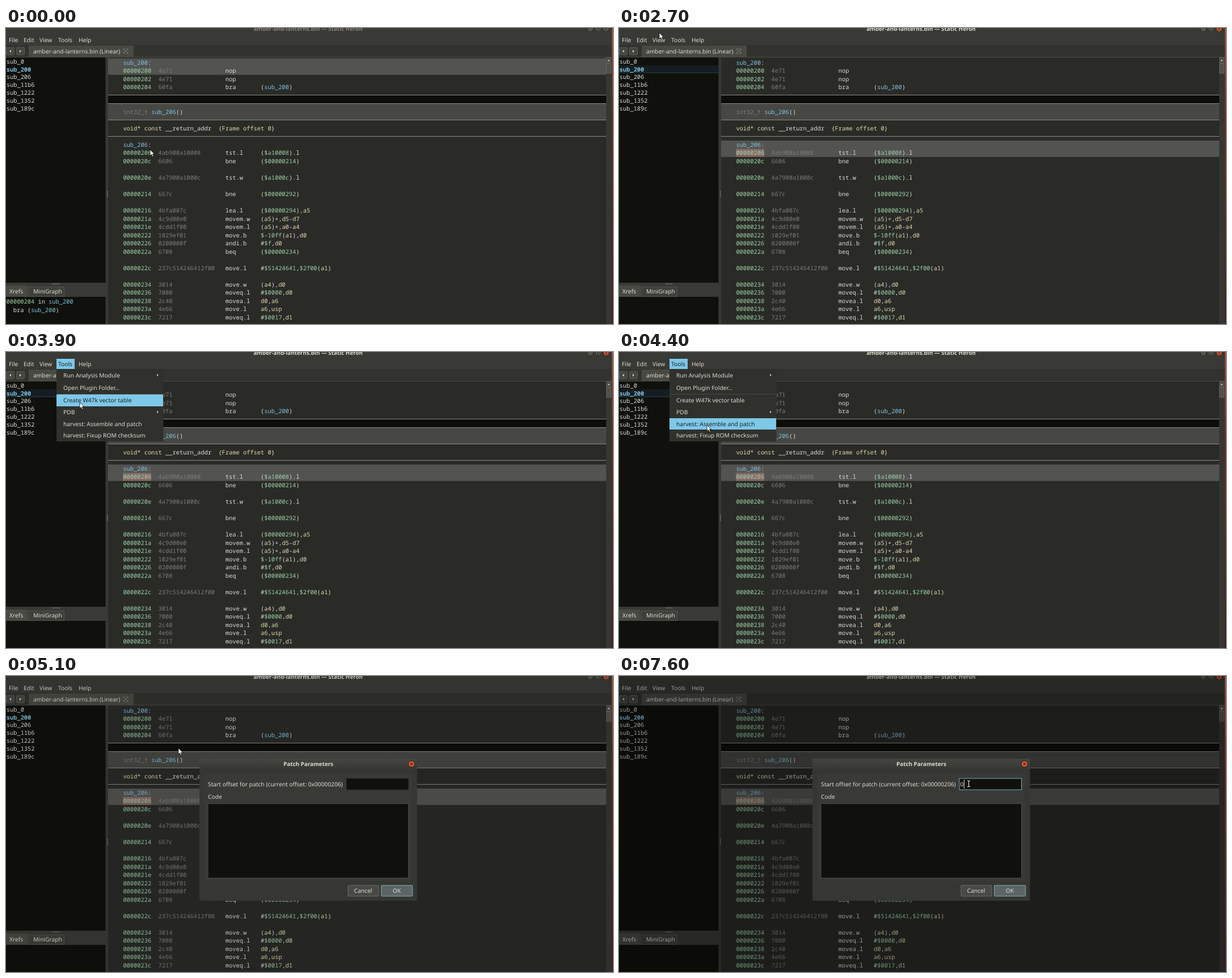
These frames come from a looping animation (1070 px wide and 523 px high, 8 s). An HTML page:

```html
<!DOCTYPE html>
<html lang="en">
<head>
<meta charset="utf-8">
<title>Disassembler patch</title>
<style>
html, body { margin: 0; width: 100%; height: 100%; overflow: hidden; background: #2a2b27; }
svg { display: block; width: 1070px; height: 523px; }
text { white-space: pre; text-rendering: geometricPrecision; }
.ui { font: 10.25px "Noto Sans", "Open Sans", sans-serif; fill: #dcdad2; }
.bold { font: bold 9.85px "Noto Sans", "Open Sans", sans-serif; fill: #dfdbd2; }
.mono { font: 10.37px "Noto Sans Mono", "DejaVu Sans Mono", monospace; fill: #dcdcda; }
.num { fill: #9cd0a8; }
.reg { fill: #e4d8b0; }
.fn { fill: #80c0e0; }
.dim { fill: #7c7d7a; }
.st { display: none; }
.st.on { display: inline; }
.item rect { fill: none; }
.item.on rect { fill: #7ec8e8; }
.item.on text { fill: #1c2226; }
.item path { fill: #b5b3ac; }
</style>
</head>
<body>
<svg id="stage" viewBox="0 0 1070 523" xmlns="http://www.w3.org/2000/svg"></svg>
<script>
const LOOP = 8000, STEP = 100;
const CELL = 6.222, LEFT = 206.4, PITCH = 14.52;
const FILE = 'amber-and-lanterns.bin';

const esc = s => s.replace(/&/g, '&amp;').replace(/</g, '&lt;');
const rect = (x, y, w, h, fill, more = '') =>
  `<rect x="${x}" y="${y}" width="${w}" height="${h}" fill="${fill}" ${more}/>`;
// y is the middle of the capitals
const text = (x, y, s, cls = 'ui', more = '') =>
  `<text x="${x}" y="${y + 3.7}" class="${cls}" ${more}>${esc(s)}</text>`;
const path = (d, more) => `<path d="${d}" ${more}/>`;
const group = (id, body, cls = 'st') => `<g id="${id}" class="${cls}">${body}</g>`;
const middle = 'text-anchor="middle"';

const rowY = row => 61 + row * PITCH;
const code = (row, col, s, cls = '') =>
  text(LEFT + col * CELL, rowY(row), s, 'mono ' + cls);
const band = (row, count, fill) => rect(180, rowY(row) - 7.4, 878, count * PITCH, fill);
const rule = y => rect(180, y, 878, 1, '#8b8c88');

function operands(row, s) {
  const parts = s.matchAll(/(\$-?[0-9a-f]+)|(\b[ad][0-7]\b|usp)|(sub_\w+)|./g);
  let out = '';
  for (const p of parts) {
    const cls = p[1] ? 'num' : p[2] ? 'reg' : p[3] ? 'fn' : '';
    out += code(row, 39 + p.index, p[0], cls);
  }
  return out;
}

const listing = `1 00000200 4e71 nop
2 00000202 4e71 nop
3 00000204 60fa bra (sub_200)
11 00000206 4ab900a10008 tst.l ($a10008).l
12 0000020c 6606 bne ($00000214)
14 0000020e 4a7900a1000c tst.w ($a1000c).l
16 00000214 667c bne ($00000292)
18 00000216 4bfa007c lea.l ($00000294),a5
19 0000021a 4c9d00e0 movem.w (a5)+,d5-d7
20 0000021e 4cdd1f00 movem.l (a5)+,a0-a4
21 00000222 1029ef01 move.b $-10ff(a1),d0
22 00000226 0200000f andi.b #$f,d0
23 0000022a 6708 beq ($00000234)
25 0000022c 237c514246412f00 move.l #$51424641,$2f00(a1)
27 00000234 3014 move.w (a4),d0
28 00000236 7000 moveq.l #$0000,d0
29 00000238 2c40 movea.l d0,a6
30 0000023a 4e66 move.l a6,usp
31 0000023c 7217 moveq.l #$0017,d1`;

function codeView() {
  let out = rect(180, 52, 878, 471, '#2a2b27')
    + group('selFirst', band(0, 2, '#535451'))
    + group('selSecond', band(10, 2, '#535451'))
    + rect(180, 119, 878, 14, '#0d0e0a') + rect(180, 133, 878, 29, '#474844')
    + [118, 133, 162, 191].map(rule).join('')
    + group('mark', rect(206, 213.5, 50, 14, '#876866'))
    + code(0, 0, 'sub_200', 'fn') + code(0, 7, ':')
    + code(6, 0, 'int32_t', 'dim') + code(6, 8, 'sub_206', 'fn') + code(6, 15, '()')
    + code(8, 0, 'void* const', 'reg') + code(8, 12, '__return_addr')
    + code(8, 27, '{Frame offset 0}', 'reg')
    + code(10, 0, 'sub_206', 'fn') + code(10, 7, ':');
  for (const line of listing.split('\n')) {
    const [row, addr, bytes, op, args = ''] = line.split(' ');
    out += code(+row, 0, addr, 'num') + code(+row, 10, bytes, 'dim')
      + code(+row, 29, op) + operands(+row, args);
  }
  return out;
}

function windowButtons(closeFill) {
  return [1030, 1044, 1058].map((x, i) =>
    `<circle cx="${x}" cy="1.5" r="5" fill="${i == 2 ? closeFill : '#5c5b55'}" stroke="#272723"/>`).join('')
    + path('M1028 2h4M1042.500 0h3.500v4h-3.500zM1056 0l4 4m0-4l-4 4', 'stroke="#30302c" fill="none"');
}

function chrome() {
  const title = `${FILE} — Static Heron`;
  const caption = fill => text(532.5, 1.6, title, 'bold', `${middle} style="fill:${fill}"`);
  const arrow = (x, d) => rect(x, 34.5, 14, 13, '#454640', 'stroke="#5b5b55" rx="1"')
    + path(d, 'fill="#d0cec6"');
  const names = [[5, 'File'], [31, 'Edit'], [59, 'View'], [128, 'Help']];
  return rect(0, 0, 1068, 523, '#393935') + rect(0, 30, 1068, 22, '#32332e')
    + group('idle', caption('#85837b') + windowButtons('#5c5b55'))
    + group('active', caption('#dfdbd2') + windowButtons('#d2552e'))
    + names.map(([x, s]) => text(x, 21, s)).join('')
    + group('tools', rect(89, 12, 32, 18, 'none') + text(92, 21, 'Tools'), 'item')
    + arrow(0.5, 'M9 38.500v5l-3-2.500z') + arrow(18.500, 'M24 38.500v5l3-2.500z')
    + rect(40, 31, 185, 21, '#484943')
    + text(48, 41.5, `${FILE} (Linear)`)
    + path('M207 37l8 8m0-8l-8 8M207 40v-3h3m2 0h3v3m0 2v3h-3m-2 0h-3v-3', 'stroke="#77776f" fill="none"')
    + rect(0, 51, 1068, 1, '#4b4c46');
}

function sidebar() {
  const names = ['sub_0', 'sub_200', 'sub_206', 'sub_11b6', 'sub_1222', 'sub_1352', 'sub_189c'];
  let out = rect(0, 52, 175.5, 398, '#10110c')
    + group('listFocus', rect(0, 66, 175.5, 13.500, '#151d22') + rect(0, 78.5, 175.5, 1, '#2c4451'));
  names.forEach((s, i) => {
    out += text(0.8, 59 + i * 13.85, s, 'mono' + (i == 1 ? ' fn' : ''),
      i == 1 ? 'font-weight="bold" style="font-weight:bold"' : '');
  });
  for (let i = 0; i < 6; i++) out += rect(82 + i * 2.2, 451.5, 1.2, 1.5, '#8a8a83');
  for (let i = 0; i < 5; i++) out += rect(178, 288 + i * 2.2, 1.5, 1.2, '#8a8a83');
  return out
    + rect(0, 455, 37, 20, '#494a44') + rect(38.5, 457.5, 64, 17, '#3f403b', 'stroke="#53544e"')
    + text(6, 465, 'Xrefs') + text(48, 465.5, 'MiniGraph')
    + rect(0, 475, 175.5, 48, '#10110c')
    + group('xrefs', text(0.5, 483.5, '00000204', 'mono num') + text(56.5, 483.5, 'in', 'mono')
      + text(75, 483.5, 'sub_200', 'mono fn') + text(12.8, 498, 'bra (', 'mono')
      + text(12.8 + 5 * CELL, 498, 'sub_200', 'mono fn') + text(12.8 + 12 * CELL, 498, ')', 'mono'));
}

const scrollbar = () => rect(1058, 52, 9.500, 471, '#363732')
  + rect(1058.5, 52.5, 8, 9, '#484943', 'stroke="#5b5c56"')
  + path('M1060 58.500h5l-2.500-3z', 'fill="#c0beb6"')
  + rect(1058.5, 62.5, 8, 17.500, '#50514b', 'stroke="#63645e"');

function menu() {
  const items = [
    [31, 21, 'Run Analysis Module', 1], [53, 21, 'Open Plugin Folder...'],
    [75, 21, 'Create W47k vector table'], [96, 21, 'PDB', 1],
    [117, 20, 'harvest: Assemble and patch'], [137, 20.5, 'harvest: Fixup ROM checksum']];
  return group('menu', rect(89, 30, 188.5, 128, '#30312d')
    + rect(90, 74, 186, 1, '#484943')
    + items.map(([y, h, s, sub], i) => group('item' + i,
      rect(89, y, 188, h, 'none') + text(101, y + h / 2, s)
      + (sub ? path(`M266 ${y + 7.5}v5l3-2.500z`, '') : ''), 'item')).join(''));
}

function dialog() {
  return group('dialog', rect(341, 146, 383.5, 251, '#363733', 'rx="2"')
    + rect(341, 146, 383.5, 20, 'url(#bar)', 'rx="2"')
    + text(533, 155.5, 'Patch Parameters', 'bold', middle)
    + '<circle cx="714.800" cy="155.500" r="5.500" fill="#dc5a32" stroke="#23231f"/>'
    + path('M712.800 153.500l4 4m0-4l-4 4', 'stroke="#4a2115" stroke-width="1.200"')
    + rect(349.5, 172.5, 366, 190, '#393a36', 'rx="2"')
    + text(356, 191.5, 'Start offset for patch (current offset: 0x00000206)')
    + rect(600, 181, 109.5, 20, '#10110c', 'stroke="#272823"')
    + group('field', rect(600, 181, 109.5, 20, '#10110c', 'stroke="#7fb2cc"'))
    + group('caret', rect(601, 183, 1, 16, '#e8e8e6'))
    + group('typed', text(601.5, 191.5, '0') + rect(607.8, 183, 1, 16, '#e8e8e6'))
    + text(356, 213.5, 'Code')
    + rect(356, 225.5, 353.5, 131.5, '#10110c', 'stroke="#4a4b46"')
    + rect(603, 370, 54, 19, '#494a46', 'stroke="#6c6d68" rx="1"')
    + rect(661.5, 370, 55, 19, '#5c6564', 'stroke="#86a9bb" rx="1"')
    + text(629.5, 379.5, 'Cancel', 'ui', middle) + text(689, 379.5, 'OK', 'ui', middle));
}

const pointer = () => `<g id="pointer">`
  + group('arrow', path('M0 0V10.500L2.400 8.400L4.200 12.300L6 11.500L4.300 7.700H7.600Z',
    'fill="#fff" stroke="#111" stroke-width=".8"'))
  + group('beam', path('M-2.500-5Q0-5 0-4Q0-5 2.500-5M0-4V5M-2.500 5.500Q0 5.500 0 4.500Q0 5.500 2.500 5.500',
    'fill="none" stroke="#eee" stroke-width="1.100"')) + '</g>';

document.getElementById('stage').innerHTML = `<defs>
  <linearGradient id="bar" x2="0" y2="1"><stop stop-color="#454540"/><stop offset="1" stop-color="#363733"/></linearGradient>
  <linearGradient id="desk" x2="0" y2="1"><stop stop-color="#a8502f"/><stop offset=".3" stop-color="#742d22"/><stop offset="1" stop-color="#4a191b"/></linearGradient>
  </defs>` + chrome() + sidebar() + codeView() + scrollbar()
  + rect(0, 0, 1068, 523, '#000', 'id="shade" opacity="0"')
  + rect(1068, 0, 2, 523, 'url(#desk)') + menu() + dialog() + pointer();

// id: from, to, from, to ...
const shown = {
  idle: [0, 1700], active: [1700, LOOP],
  selFirst: [0, 1700], selSecond: [1700, LOOP], mark: [1700, LOOP],
  xrefs: [0, 1700], listFocus: [1600, 4800],
  tools: [3200, 4800], menu: [3400, 4800],
  item0: [3700, 3800], item1: [3800, 3900], item2: [3900, 4200],
  item3: [4200, 4300], item4: [4300, 4800],
  dialog: [4900, LOOP], field: [6200, LOOP],
  caret: [6300, 6800, 7300, 7600], typed: [7600, LOOP],
  arrow: [0, 5900], beam: [5900, LOOP]
};

// moves: start time, then one point per step
const moves = [
  [0, [254, 215]],
  [700, [253, 218], [251, 222], [248, 226], [243, 225], [239, 220], [237.5, 217.5]],
  [1700, [248, 226]],
  [2200, [180, 146], [103.5, 67]],
  [2700, [71, 8.5], [98, 12], [121, 15], [130, 17], [112, 18], [97.5, 18]],
  [3600, [104, 24], [112, 45], [122, 66], [130, 89]],
  [4200, [142, 105], [152, 122], [155, 129]],
  [4800, [158, 129], [190, 130], [248, 130], [304, 127.5], [380, 138],
    [460, 156], [530, 172], [575, 184], [591, 190]],
  [5900, [604, 190], [614, 190]],
  [6200, [616.5, 190]]
];

const el = id => document.getElementById(id);
const nodes = Object.entries(shown).map(([id, spans]) => [el(id), spans]);
const shade = el('shade'), mouse = el('pointer');

function draw(t) {
  for (const [node, spans] of nodes) {
    node.classList.toggle('on', spans.some((a, i) => i % 2 == 0 && t >= a && t < spans[i + 1]));
  }
  const [start, ...points] = moves.findLast(m => m[0] <= t);
  const step = Math.floor((t - start) / STEP);
  const [x, y] = points[Math.min(step, points.length - 1)];
  mouse.setAttribute('transform', `translate(${x} ${y})`);
  const tick = Math.floor(t / STEP) * STEP;
  shade.setAttribute('opacity', 0.3 * Math.min(1, Math.max(0, (tick - 4800) / 800)));
}

const begin = performance.now();
function frame() {
  draw((performance.now() - begin) % LOOP);
  requestAnimationFrame(frame);
}
frame();
</script>
</body>
</html>
```
